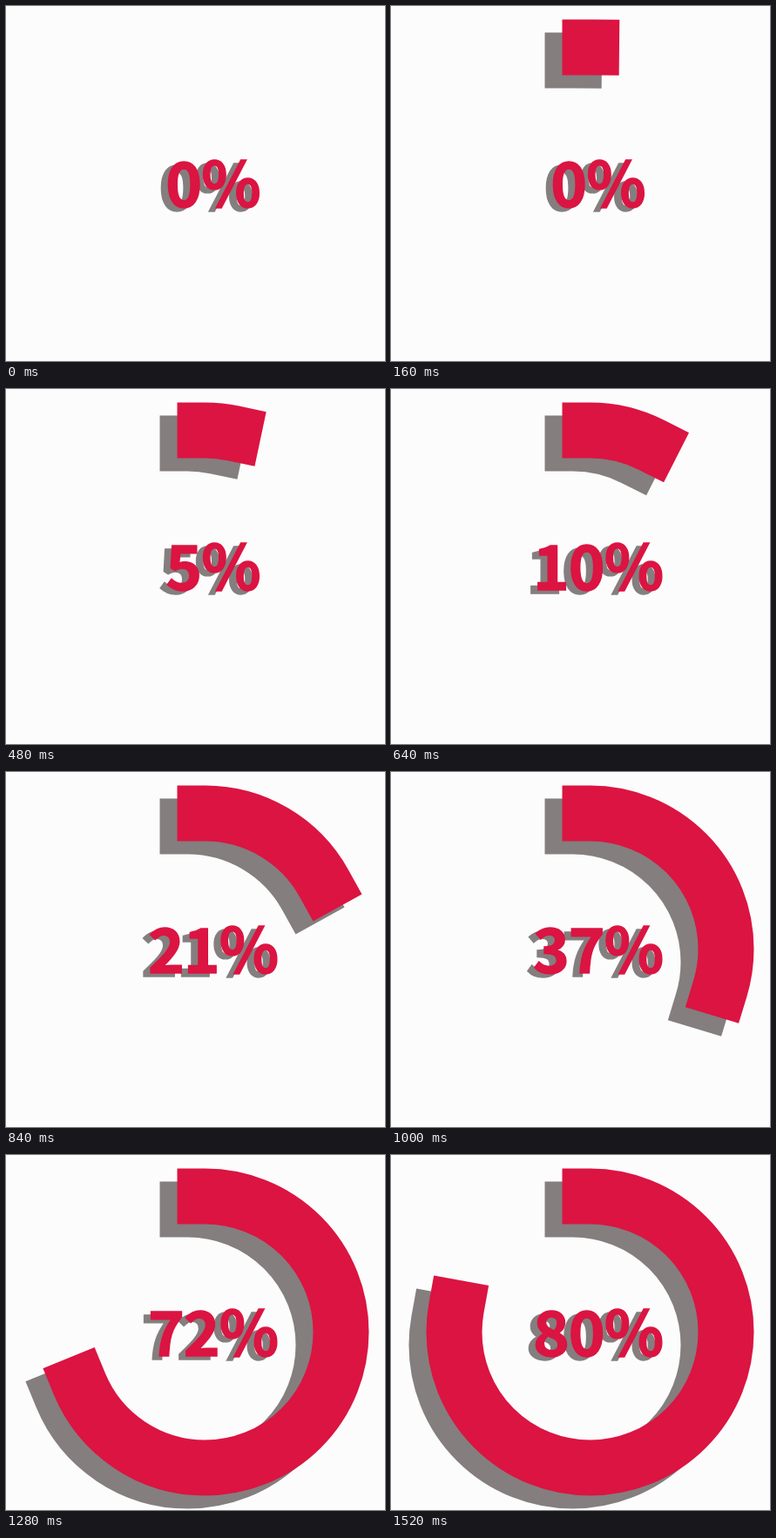
Animation of 435x408 px, one loop 4440 ms. Source, as an HTML page:

```html
<!DOCTYPE html>
<html lang="en">
<head>
<meta charset="utf-8">
<title>Progress ring</title>
<style>
  html, body { margin: 0; width: 100%; height: 100%; overflow: hidden; background: #fcfcfc; }
  svg { --red: #db1442; --gray: #847e7e; display: block; width: 435px; height: 408px; }
  #ring {
    fill: none; stroke: var(--red); stroke-width: 64; stroke-linecap: square;
    filter: drop-shadow(-20px 15px var(--gray));
  }
  #label {
    font: bold 71px "Noto Sans CJK JP", "Noto Sans CJK SC", "Noto Sans CJK", sans-serif;
    letter-spacing: -1px; text-anchor: middle;
    fill: var(--red); stroke: var(--red); stroke-width: 1.4px;
    filter: drop-shadow(-8px 4px var(--gray));
  }
</style>
</head>
<body>
<svg viewBox="0 0 435 408">
  <path id="ring" pathLength="100" d="M228.5 47.5a156 156 0 0 1 0 312a156 156 0 0 1 0 -312"/>
  <text id="label" x="237.5" y="230.6">0%</text>
</svg>
<script>
  const LOOP = 4440, END = 1520, STEP = 40, LAG = 65;
  const ring = document.getElementById('ring');
  const label = document.getElementById('label');

  // accelerating rise, then a steady run up to 80
  function percent(ms) {
    const s = Math.max(0, ms) / 1000;
    const rise = 15.6 * s ** 2 + 21 * s ** 4;
    const finish = 80 - (END - ms) / 30;
    return Math.min(rise, finish < 60 ? rise : finish);
  }

  function draw(time) {
    const t = Math.min(END, Math.floor(time % LOOP / STEP) * STEP);
    label.textContent = Math.round(percent(t)) + '%';
    // the ring trails the number slightly
    ring.style.strokeDasharray = percent(t - LAG) + 0.01 + ' 200';
    ring.style.display = t ? '' : 'none';
  }

  let start;
  function tick(now) {
    start ??= now;
    draw(now - start);
    requestAnimationFrame(tick);
  }
  draw(0);
  requestAnimationFrame(tick);
</script>
</body>
</html>
```
